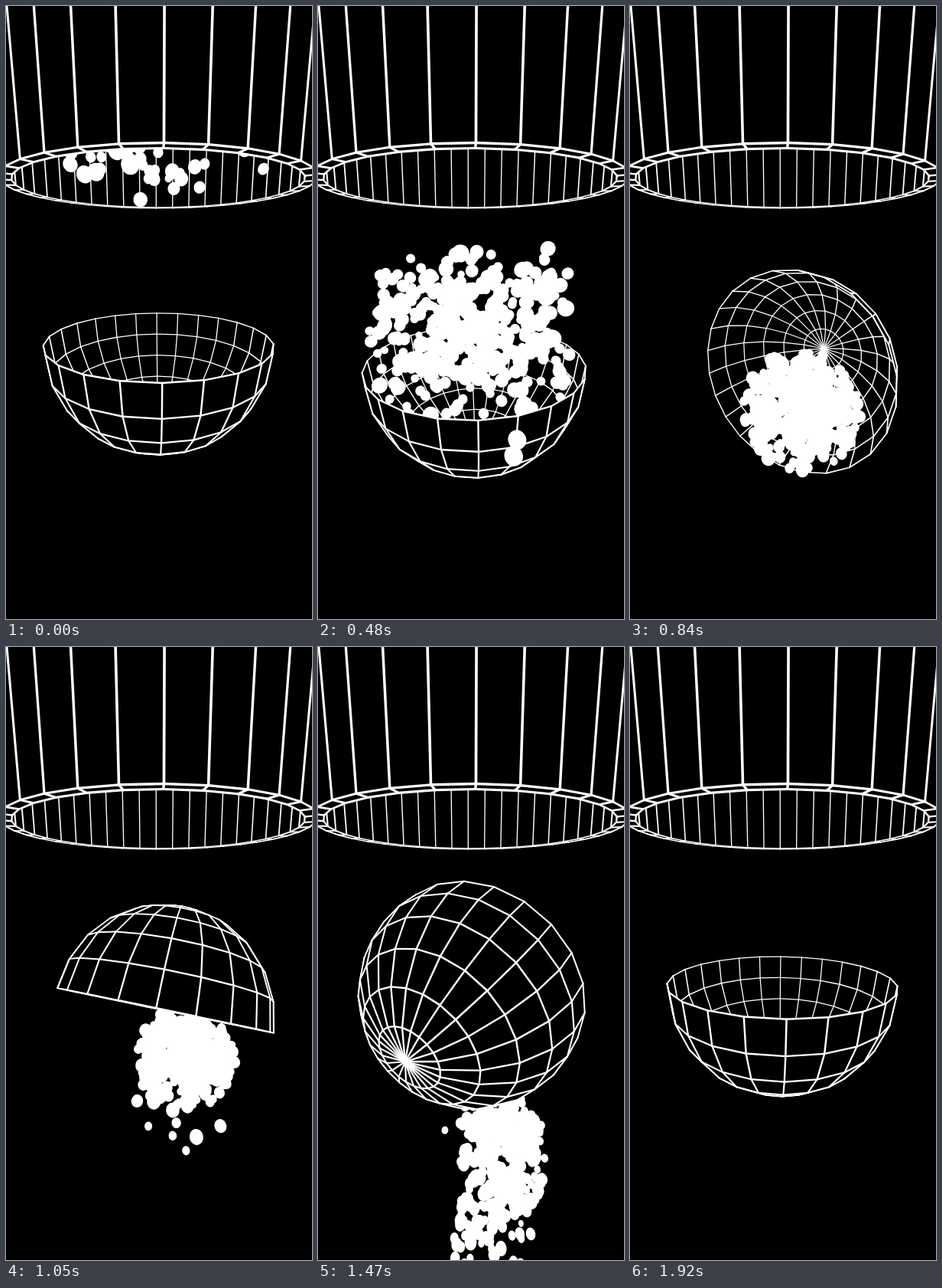
An HTML page with a canvas for the animation above (1.95 s loop, 400 px wide and 800 px high).

```html
<!DOCTYPE html>
<html lang="en">
<head>
<meta charset="utf-8">
<title>Bowl and falling balls</title>
<style>
html, body { margin: 0; width: 100%; height: 100%; overflow: hidden; background: #000; }
canvas { display: block; width: 400px; height: 800px; }
</style>
</head>
<body>
<canvas id="stage" width="400" height="800"></canvas>
<script>
const ctx = document.getElementById('stage').getContext('2d');
const LOOP = 1950, FOCAL = 400, INK = 4.7, RAD = Math.PI / 180;
const { sin, cos } = Math;
const PITCH_C = cos(12 * RAD), PITCH_S = sin(12 * RAD);
const AXIS = 2.713; // distance from the camera to the shared vertical axis

// World (right, down, forward) to camera space.
const toCam = (x, h, z) => [x, h * PITCH_C - z * PITCH_S, z * PITCH_C + h * PITCH_S];
const project = p => [199 + FOCAL * p[0] / p[2], 400 + FOCAL * p[1] / p[2]];
const clamp = u => Math.min(1, Math.max(0, u));
const smooth = u => { u = clamp(u); return u * u * (3 - 2 * u); };

// Share of the bowl's full tumble done at time t.
const tumbled = t => 1 - (1 - clamp((t - 440) / 1560) ** 1.5) ** 2;

// The bowl sinks under the balls and slowly rises again.
function bowlCentre(t) {
  const sink = sin(Math.PI * clamp((t - 300) / 1650) ** .6) ** 2;
  return toCam(.003 + .05 * sink, .797 + .4 * sink, AXIS + .05 * sink);
}

function trace(points) {
  ctx.beginPath();
  points.forEach((p, i) => i ? ctx.lineTo(p[0], p[1]) : ctx.moveTo(p[0], p[1]));
}

function line(a, b) {
  ctx.lineWidth = INK * 2 / (a[2] + b[2]);
  trace([project(a), project(b)]);
  ctx.stroke();
}

function fill(points) {
  trace(points);
  ctx.fillStyle = '#000';
  ctx.fill();
}

// Tube
const SIDES = 36, TUBE_H = -.465, OUTER = 1.19, INNER = OUTER * .935;
const tubePoint = (radius, i, rise = 0) => {
  const a = (i * 10 + 1.25) * RAD;
  return toCam(radius * sin(a), TUBE_H - rise, AXIS - radius * cos(a));
};

function tubeRim(from, to) {
  for (let i = from; i < to; i++) {
    line(tubePoint(OUTER, i), tubePoint(OUTER, i + 1));
    line(tubePoint(INNER, i), tubePoint(INNER, i + 1));
    line(tubePoint(OUTER, i), tubePoint(INNER, i));
  }
}

function tubeBack() {
  const mouth = Array.from({ length: SIDES }, (_, i) => project(tubePoint(INNER, i)));
  ctx.save();
  trace(mouth);
  ctx.closePath();
  ctx.clip();
  for (let i = 6; i <= 30; i++) line(tubePoint(INNER, i), tubePoint(INNER, i, .9));
  ctx.restore();
  tubeRim(9, 27);
}

function tubeFront() {
  const edge = [];
  for (let i = -7; i <= 7; i++) edge.push(project(tubePoint(INNER, i)));
  fill([[-20, 0], ...edge, [420, 0]]);
  for (let i = -6; i <= 6; i++) line(tubePoint(OUTER, i), tubePoint(OUTER, i, .9));
  tubeRim(-9, 9);
}

// Bowl
const MERIDIANS = 24, BANDS = 6, STEP = 15 * RAD, HEADING = 28 * RAD;

function bowlMesh(t) {
  const centre = bowlCentre(t), done = tumbled(t);
  const tumble = done * 2 * Math.PI, spin = 1.2 * RAD - done * STEP;
  const ct = cos(tumble), st = sin(tumble), ch = cos(HEADING), sh = sin(HEADING);
  const points = [];
  for (let j = 0; j <= BANDS; j++) {
    for (let i = 0; i < MERIDIANS; i++) {
      const lat = j * STEP, lon = i * STEP + spin + HEADING;
      const up = -sin(lat), near = cos(lat) * cos(lon), side = cos(lat) * sin(lon);
      const up2 = up * ct - near * st, near2 = up * st + near * ct;
      const p = toCam(side * ch - near2 * sh, -up2, -near2 * ch - side * sh);
      points.push(p.map((v, k) => v + centre[k]));
    }
  }
  const flat = points.map(project), inside = [], outside = [];
  for (let j = 0; j < BANDS; j++) {
    for (let i = 0; i < MERIDIANS; i++) {
      const a = j * MERIDIANS + i, b = j * MERIDIANS + (i + 1) % MERIDIANS;
      const face = [a, b, b + MERIDIANS, a + MERIDIANS];
      const area = face.reduce((sum, v, k) => {
        const p = flat[v], q = flat[face[(k + 1) % 4]];
        return sum + p[0] * q[1] - q[0] * p[1];
      }, 0);
      (area > 0 ? outside : inside).push(face);
    }
  }
  return { points, flat, inside, outside };
}

function drawFaces(mesh, faces) {
  faces.forEach(face => fill(face.map(v => mesh.flat[v])));
  const done = new Set();
  for (const face of faces) {
    face.forEach((a, k) => {
      const b = face[(k + 1) % 4], key = Math.min(a, b) * 1000 + Math.max(a, b);
      if (done.has(key)) return;
      done.add(key);
      line(mesh.points[a], mesh.points[b]);
    });
  }
}

// Balls
let seed = 20117;
function random() {
  seed = seed + 0x6D2B79F5 | 0;
  let v = Math.imul(seed ^ seed >>> 15, 1 | seed);
  v = v + Math.imul(v ^ v >>> 7, 61 | v) ^ v;
  return ((v ^ v >>> 14) >>> 0) / 4294967296;
}

function makeBall(_, i) {
  const turn = random() * 2 * Math.PI, reach = .9 * random() ** .65;
  const lon = random() * 2 * Math.PI, tilt = random() * 2 - 1, depth = Math.cbrt(random());
  const ring = Math.sqrt(1 - tilt * tilt) * depth;
  return {
    x: reach * cos(turn),
    z: AXIS + .75 * reach * sin(turn),
    h: -2.05 + 1.65 * (random() + random()) / 2,
    heap: [ring * cos(lon), tilt * depth, ring * sin(lon)],
    size: .034 + .034 * random(),
    settle: 480 + 60 * random(),
    release: 820 + 470 * random() ** .45,
    kick: i % 30 ? .1 : 1.5
  };
}

// A few balls miss the bowl and drop past its front.
const makeMiss = () => ({
  x: .4 * random() - .05,
  z: AXIS - 1.05,
  h: -.95 + .2 * random(),
  size: .04 + .02 * random(),
  settle: Infinity,
  release: Infinity
});

const balls = Array.from({ length: 430 }, makeBall);
const misses = Array.from({ length: 2 }, makeMiss);

function fallAt(ball, t) {
  const s = t / 1000;
  return toCam(ball.x, ball.h + 1.9 * s + 4.75 * s * s, ball.z);
}

// The heap lies in the bowl and slides out of it as it tumbles.
function heapAt(ball, t) {
  const done = tumbled(t), spread = .72 - .5 * done;
  const slide = [.55 * done, .3 + 1.1 * done * done, .08 + .42 * done];
  return bowlCentre(t).map((v, k) => v + slide[k] + ball.heap[k] * spread);
}

function ballAt(ball, t) {
  if (t < ball.settle) return fallAt(ball, t);
  const rest = heapAt(ball, Math.min(t, ball.release));
  if (t > ball.release) {
    const s = (t - ball.release) / 1000, drop = 2 * s + 6 * s * s;
    const drift = ball.heap[0] * ball.kick * s;
    return [rest[0] + drift, rest[1] + drop * PITCH_C, rest[2] + drop * PITCH_S];
  }
  const w = smooth((t - ball.settle) / 190);
  return fallAt(ball, t).map((v, k) => v + (rest[k] - v) * w);
}

function drawBall(ball, t) {
  const p = ballAt(ball, t), [x, y] = project(p);
  if (y > 830) return;
  const r = ball.size * FOCAL / p[2], dx = x - 200, dy = y - 400;
  ctx.beginPath();
  ctx.ellipse(x, y, r * Math.hypot(1, dx / FOCAL, dy / FOCAL), r, Math.atan2(dy, dx), 0, 7);
  ctx.fillStyle = '#fff';
  ctx.fill();
}

function draw(t) {
  ctx.fillStyle = '#000';
  ctx.fillRect(0, 0, 400, 800);
  ctx.strokeStyle = '#fff';
  ctx.lineCap = ctx.lineJoin = 'round';
  const bowl = bowlMesh(t);
  tubeBack();
  drawFaces(bowl, bowl.inside);
  balls.forEach(ball => drawBall(ball, t));
  drawFaces(bowl, bowl.outside);
  misses.forEach(ball => drawBall(ball, t));
  tubeFront();
}

const start = performance.now();
function tick() {
  draw((performance.now() - start) % LOOP);
  requestAnimationFrame(tick);
}
tick();
</script>
</body>
</html>
```
